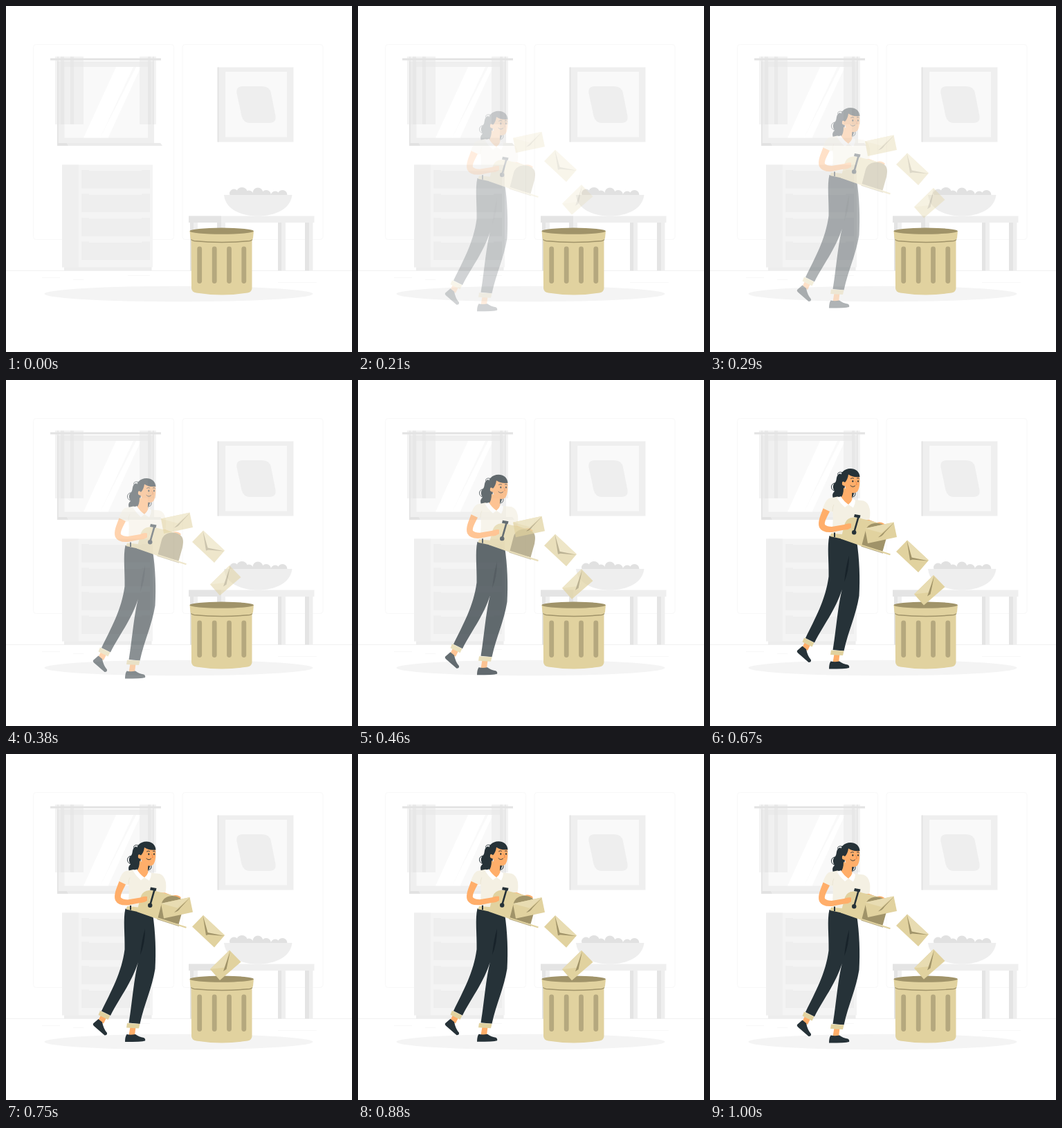
These frames come from a looping animation (500 by 500 pixels, 1.04 s). An HTML page:

```html
<!DOCTYPE html>
<html lang="en">
<head>
<meta charset="utf-8">
<title>Emptying the mailbox</title>
<style>
html, body { margin: 0; width: 100%; height: 100%; overflow: hidden; background: #fff; }
svg { display: block; width: 100%; height: 100%; }
.ink { fill: #263238; }
.skin { fill: #ffae6a; }
.tan { fill: #e1d29f; }
.dark { fill: #a09369; }
.line { fill: none; stroke: #263238; stroke-linecap: round; }
</style>
</head>
<body>
<svg viewBox="0 0 500 500">
  <!-- walls and floor -->
  <g fill="none" stroke="#f8f8f8">
    <rect x="39.5" y="55.5" width="203" height="282" rx="4"/>
    <rect x="255" y="55.5" width="203" height="282" rx="4"/>
    <path stroke="#f1f1f1" d="M0 382.5H500"/>
    <path d="M97 395.5h15M176 389.5h32M393 399.5h56M52 392.5h26"/>
  </g>
  <ellipse cx="249.500" cy="416" rx="194" ry="11.300" fill="#f4f4f4"/>

  <!-- window -->
  <path fill="#efefef" d="M74 80H214V202H74z"/>
  <path fill="#e2e2e2" d="M74 80h1.500V198H88l2 4H74z"/>
  <path fill="#f9f9f9" d="M84.500 88H205V190.500H84.500z"/>
  <path fill="#fff" d="M159 88h25L136 190.500H112zM188 88h7L147.500 190.500H136z"/>
  <path fill="#ebebeb" d="M88 198H223l3 4H90z"/>
  <path fill="#e8e8e8" opacity=".5" d="M71 73h41v98H71zM193 73h24v98h-24z"/>
  <path fill="#e3e3e3" opacity=".55" d="M74 73h2v98h-2zM79 73h5v98h-5zM93 73h5v98h-5zM205 73h4v98h-4zM212 73h2v98h-2z"/>
  <path fill="#e3e3e3" d="M64 75.500H224v3H64z"/>

  <!-- drawers -->
  <path fill="#ededed" d="M84 377H210.500v5.500H84z"/>
  <path fill="#f4f4f4" d="M81 229.500H212V377.500H81z"/>
  <path fill="#efefef" d="M81 229.500h24v148H81z"/>
  <g id="drawers" fill="#eee"></g>

  <!-- picture -->
  <path fill="#efefef" d="M306 88.500H415.500V196.500H306z"/>
  <path fill="#e3e3e3" d="M305.500 88.500h2v108h-2z"/>
  <path fill="#f9f9f9" d="M317 95H406V189.500H317z"/>
  <path fill="#eee" d="M342 116H370Q381 116 383 126L389.500 159Q391 169 380 169H353Q343 169 340.500 159L333.500 126Q332 116 342 116z"/>

  <!-- table and bowl -->
  <path fill="#efefef" d="M266 313h11v69.500h-11zM305 313h12v69.500h-12zM393 313h11v69.500h-11zM432 313h11.500v69.500H432z"/>
  <path fill="#e4e4e4" d="M266 313h5v69.500h-5zM305 313h6v69.500h-6zM393 313h5v69.500h-5zM432 313h6v69.500h-6z"/>
  <path fill="#efefef" d="M264 303.500H445.500v9.500H264z"/>
  <path fill="#e4e4e4" d="M264 303.500h47v9.500h-47z"/>
  <g fill="#e1e1e1">
    <circle cx="329.500" cy="271" r="6.500"/><circle cx="341" cy="270" r="8"/><circle cx="351" cy="273" r="6.500"/>
    <circle cx="364" cy="270" r="7.500"/><circle cx="376" cy="273" r="7"/><circle cx="389" cy="274" r="6.500"/><circle cx="399.500" cy="273" r="7"/>
  </g>
  <path fill="#eee" d="M315 273H413.500C411 293 390 303.500 364 303.500S317 293 315 273z"/>

  <!-- bin -->
  <path class="tan" d="M267.500 334H355.500V408Q355 413.500 349 414.500Q312 420.500 275 414.500Q268.500 413.500 268 408z"/>
  <path class="tan" d="M265.500 325H358L357 335Q356.500 338.500 352 339.500Q312 343.500 271 339.500Q267 338.500 266.500 335z"/>
  <path fill="none" stroke="#a09369" stroke-width="1.300" d="M267.500 337.500Q269 339 272 339.500Q312 343.500 352 339.500Q355 339 356 337.500"/>
  <ellipse class="dark" cx="311.700" cy="325.200" rx="46.200" ry="4.600"/>
  <path stroke="#b5a87e" stroke-width="6.800" stroke-linecap="round" d="M279.700 351v46.500M301.200 351v46.500M322.500 351v46.500M343.800 351v46.500"/>

  <g id="woman">
    <!-- feet -->
    <path class="skin" d="M137 379L145 383L141 391L133 387zM179.500 396H187.500L186 408H177.500z"/>
    <path class="ink" d="M126 391L133.500 384.500L139 389Q141 399 146 404.500Q146.500 408 142.500 408L127 394.500Q125 392.500 126 391z"/>
    <path class="ink" d="M174.500 406.500Q180 408 187 406.500Q192 410.500 199 411.500Q202 413 201 416Q196 417.500 172 417.500Q172 410 174.500 406.500z"/>
    <!-- trousers -->
    <path class="ink" d="M172.500 225L212 233C216 258 217 288 215.500 312C211 340 200 362 193.500 391.500L177.500 390C183 358 185 318 194 292C184 330 166 350 151 379.500L138 373C152 344 167 318 171.500 284C172 262 169 240 172.500 225z"/>
    <path fill="#18232a" d="M194 292Q196 270 201 254Q201 276 194 292z"/>
    <path class="tan" d="M136 372.500L150.500 379.500L147.500 385.500L133.500 378.500zM175 390.500L193.500 391.500L192 398L174 397z"/>
    <!-- hair behind the neck -->
    <path class="ink" d="M188 135C181 138 184 144 181 148C176 152 178 158 180 161C176 164 177 168 178 171L190 170C195 166 194 154 196 145z"/>
    <path class="ink" d="M200 161L209 160Q207 170 203 173z"/>
    <path class="line" d="M209 160Q212 167 207 169M180 149C174 150 174 158 179 160M188 140C181 136 186 131 192 134"/>
    <!-- shirt -->
    <path fill="#f4f0e3" d="M184 168.500L172 171C166 175 165 181 163 186L174 191L177 190C179 203 176 213 177 224L212 234L220 204L230 203Q232 196 231 187Q229 177 222 174.500L208 173z"/>
    <path fill="none" stroke="#e7e1cd" stroke-width=".7" d="M177 190Q177 183 179 180"/>
    <path class="skin" d="M193 156L206 160Q204 168 206 174Q203 180 199 180Q193 176 189 170Q193 166 193 156z"/>
    <path fill="#fff" d="M189 168Q193 175 200 180L195 184Q188 178 183.500 170.500zM206 171.500Q204 177 200 180L207 184.500Q210 179 210 174z"/>
    <!-- head -->
    <path class="skin" d="M193 140C197 134 212 134 216 140C217 148 216 157 213 161C209 165 201 163 197 159L195 153C189 153 189 145 193 146z"/>
    <path class="ink" d="M188 146C187 134 194 128 203 128C210 128 216 132 216.500 140Q206 141 200 136.500Q199 144 195 148Q190 144 191 152z"/>
    <ellipse class="ink" cx="206.300" cy="146.300" rx="1" ry="1.400"/>
    <ellipse class="ink" cx="214" cy="146.300" rx=".9" ry="1.400"/>
    <path class="line" stroke-width=".9" d="M203.500 142.500Q205.500 140.800 207.500 142M212.500 142Q214.500 141 215.500 142.500M203 152.500Q206 156 209.500 153"/>
    <path fill="none" stroke="#ee7e3f" stroke-width=".8" d="M210.500 146L212.500 151L210.500 151.300"/>
    <!-- belt -->
    <path class="tan" d="M175 221.500L191 223L190 229.500L173.500 226z"/>
    <path class="ink" d="M179 220.500h2v6.500h-2z"/>
    <!-- far hand and mailbox -->
    <path class="skin" d="M222 202L230 202L240 206Q249 204 253 209L250 212L228 210z"/>
    <path class="tan" d="M189 229.500L195 207Q198 199 207 198.500Q214 198 248 208L240 247L219 240z"/>
    <path class="dark" d="M219 240L225 217C228 207 240 204 250 209C258 213 256 222 255 228L249.500 247.500z"/>
    <path fill="none" stroke="#e1d29f" stroke-width="2.200" d="M218.500 238.800L260.500 252.300"/>
    <path fill="none" stroke="#a09369" stroke-width=".7" d="M218.500 240.200L250 250.300"/>
    <!-- near arm -->
    <path class="skin" d="M163.500 185.500L173 190C169 198 165 205 166 209Q169 212 176 212L194 209Q199 206.500 204 207.500L204 213.500Q199 217 194 216.500L176 220Q162 221 158 213C155 205 160 195 163.500 185.500z"/>
    <!-- flag -->
    <circle class="ink" cx="208.200" cy="220.300" r="3.200"/>
    <path class="line" stroke-width="2.600" d="M208.500 219L214.500 198"/>
    <path class="ink" d="M209 194L217.500 195.500L216.500 199.500L208 198z"/>
  </g>

  <g id="letters">
    <path class="tan" d="M224 214.500L265.500 205.500L270 227L228 236z"/>
    <path fill="#e8dcb2" d="M224 214.500L265.500 205.500L248 221z"/>
    <path class="dark" d="M266 206L243 227.500Q249 226 252 221z"/>
    <path class="tan" d="M285 231.500L316 260.500L301 278L269 248z"/>
    <path fill="#e8dcb2" d="M285 231.500L316 260.500L292 257z"/>
    <path class="dark" d="M284.500 232L289 260.500L292.500 259.500L315.500 261.500L291.500 256.500z"/>
    <path class="tan" d="M323 282L339.500 299L309 325.500L295 309.500z"/>
    <path fill="#e8dcb2" d="M323 282L295 309.500L316 307z"/>
    <path class="dark" d="M324 283.500L314 312.500L318.500 309.500z"/>
  </g>
</svg>
<script>
const LOOP = 1040, FPS = 24, SHIFT = 30;
const woman = document.getElementById('woman');
const letters = document.getElementById('letters');

document.getElementById('drawers').innerHTML = [237, 271.5, 306, 340.5]
  .map(y => `<path d="M109 ${y}h11v1.500h76v-1.500h12v26.500H109z"/>`).join('');

const bezier = (s, a, b) => 3 * (1 - s) ** 2 * s * a + 3 * (1 - s) * s * s * b + s ** 3;

// cubic-bezier(.36, -.01, .5, 1.38), solved by bisection
function ease(x) {
  let lo = 0, hi = 1;
  for (let i = 0; i < 24; i++) {
    const mid = (lo + hi) / 2;
    if (bezier(mid, .36, .5) < x) lo = mid; else hi = mid;
  }
  return bezier(hi, -.01, 1.38);
}

function place(group, from, p) {
  group.setAttribute('transform', `translate(0 ${from * (1 - p)})`);
  group.setAttribute('opacity', Math.max(0, Math.min(1, p)));
}

function draw(now) {
  const step = Math.floor((now % LOOP + 4) * FPS / 1000);
  const p = step < 3 ? 0 : ease(Math.min(1, (step + 1) / (FPS + 1)));
  place(woman, SHIFT, p);
  place(letters, -SHIFT, p);
}

let start;
function tick(now) {
  start ??= now;
  draw(now - start);
  requestAnimationFrame(tick);
}
draw(0);
requestAnimationFrame(tick);
</script>
</body>
</html>
```
